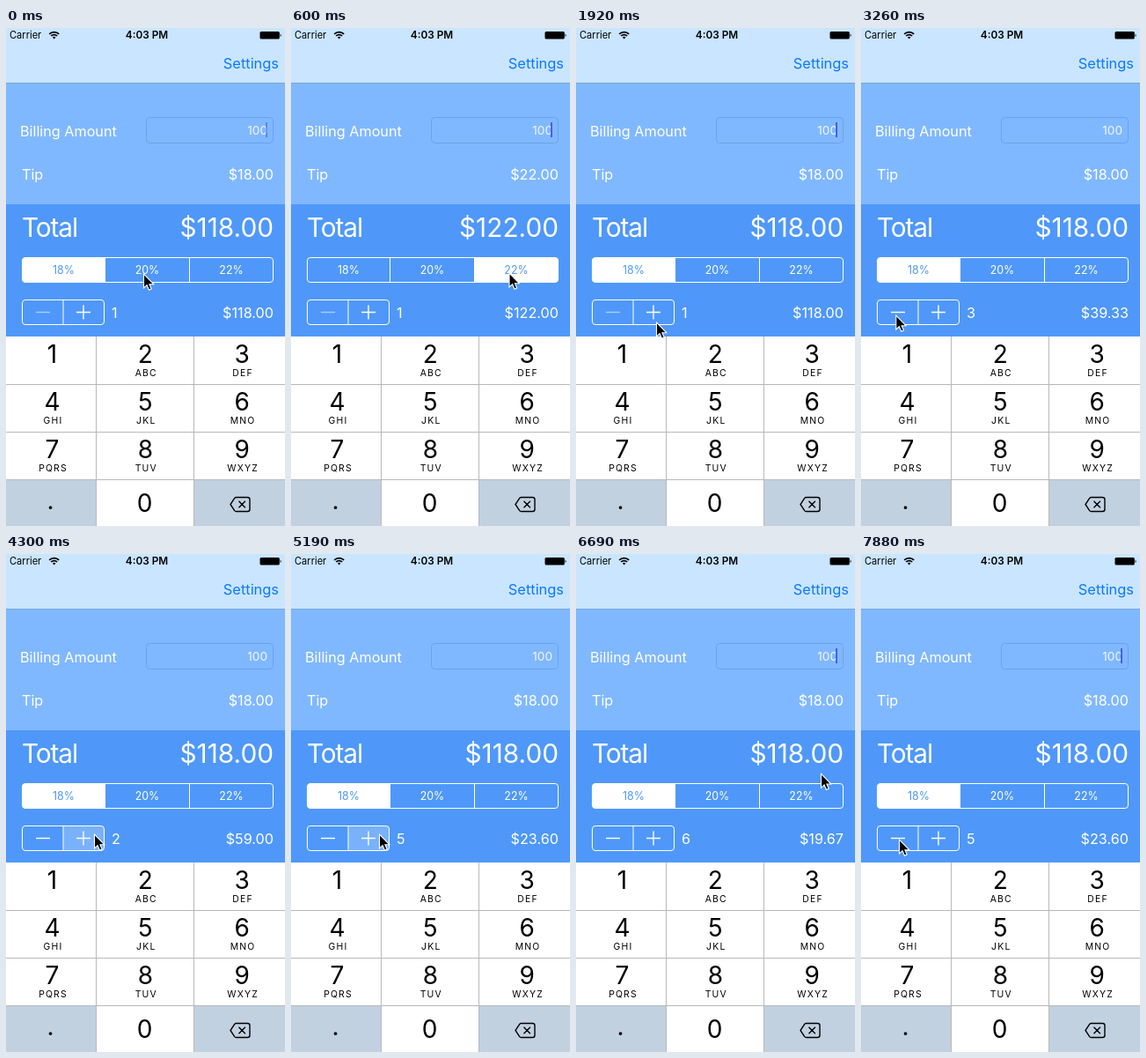
An HTML page for the animation above (8 s loop, 317 by 565 pixels).

```html
<!DOCTYPE html>
<html lang="en">
<head>
<meta charset="utf-8">
<title>Tip calculator</title>
<style>
  html, body { margin: 0; width: 100%; height: 100%; overflow: hidden; }
  svg { display: block; width: 100vw; height: 100vh; font-family: Inter, "Open Sans", sans-serif; }
  .end { text-anchor: end; }
  .mid { text-anchor: middle; }
  .label { font-size: 16.2px; }
  .big { font-size: 29.8px; }
  .line { fill: none; stroke: #fff; }
  .seg { font-size: 12.4px; text-anchor: middle; }
  .digit { font-size: 28px; text-anchor: middle; }
  .letters { font-size: 10.4px; letter-spacing: 1.2px; text-anchor: middle; }
</style>
</head>
<body>
<svg viewBox="0 0 317 565">
  <rect width="317" height="63" fill="#cae5ff"/>
  <rect y="62" width="317" height="138" fill="#80b8ff"/>
  <path d="M0 62.5H317" stroke="#78a6d8"/>
  <rect y="200" width="317" height="150" fill="#4f98f9"/>

  <text x="4" y="12.3" font-size="11.1">Carrier</text>
  <g transform="translate(.6)">
    <path d="M48.6 6.8a7.8 7.8 0 0 1 11 0M50.6 9a4.9 4.9 0 0 1 7 0" fill="none" stroke="#000" stroke-width="1.7"/>
    <path d="M54.1 12.4l-1.8-1.9a2.6 2.6 0 0 1 3.6 0z"/>
  </g>
  <text class="mid" x="160" y="12.3" font-size="11.8" font-weight="600">4:03 PM</text>
  <rect x="288.5" y="4" width="22.3" height="8.5" rx="1.5"/>
  <path d="M311.6 6.5q2 1.8 0 3.5z"/>
  <text class="end" x="310" y="46" font-size="16.4" fill="#0a7aff">Settings</text>

  <g fill="#fff">
    <text class="label" x="16" y="123.2">Billing Amount</text>
    <rect x="159.5" y="101.5" width="144" height="29" rx="4" fill="none" stroke="#6ba2ea"/>
    <text class="end" x="297" y="120.8" font-size="13.6" fill="#f0f6ff">100</text>
    <rect id="caret" x="295" y="107" width="2" height="17" fill="#4560e4"/>
    <text class="label" x="18" y="171.5">Tip</text>
    <text class="label end" id="tip" x="304" y="171.5"></text>
    <text class="big" x="18" y="237" letter-spacing="-1.1">Total</text>
    <text class="big end" id="total" x="304" y="237"></text>

    <rect id="chosen" y="260.5" height="28"/>
    <g id="segments"></g>
    <rect class="line" x="18.5" y="260.5" width="285" height="28" rx="3.5"/>
    <path class="line" d="M112.5 260.5v28M208.5 260.5v28"/>

    <rect id="pressed" y="309" width="46" height="27" fill-opacity=".24"/>
    <rect class="line" x="18.5" y="308.5" width="93" height="28" rx="3.5"/>
    <path class="line" d="M65 308.5v28"/>
    <path class="line" id="minus" d="M34 322.5h16" stroke-width="1.4"/>
    <path class="line" d="M80 322.5h16M88 314.5v16" stroke-width="1.4"/>
    <text class="label" id="count" x="120" y="328.5"></text>
    <text class="label end" id="share" x="304" y="328.5"></text>
  </g>

  <rect y="350" width="317" height="215" fill="#fff"/>
  <path d="M0 512h102.5v53H0zM213.5 512H317v53H213.5z" fill="#c2d1e0"/>
  <path d="M0 404.5H317M0 458.5H317M0 512.5H317M102.5 350V565M213.5 350V565" stroke="#b6b9bc"/>
  <g id="keys"></g>
  <path d="M261.5 532.5h13q2.5 0 2.5 2.5v11q0 2.5-2.5 2.5h-13q-1 0-1.8-.9l-4.7-7.1 4.7-7.1q.8-.9 1.8-.9zM264.5 536.8l7.4 7.4M271.9 536.8l-7.4 7.4" fill="none" stroke="#000" stroke-width="1.4"/>

  <path id="cursor" d="M0 0V16l3.6-3.3 2.4 5.5 2.7-1.2-2.3-5.3H11.3Z" stroke="#fff" stroke-width="1.1"/>
</svg>
<script>
const LOOP = 8000, TICK = 148.5, BILL = 100, RATES = [18, 20, 22];
const SEG_EDGES = [18.5, 112.5, 208.5, 303.5];
const TRAVEL = 350, PAUSE = 80, REPEAT = 295;   // pointer trip, wait before a tap, stepper repeat
const $ = id => document.getElementById(id);

const spots = {
  seg0: [57, 274], seg1: [156.5, 279], seg2: [248, 278],
  belowPlus: [91.5, 334], plus: [91, 327], plusEdge: [100.5, 318],
  minus: [38.5, 326], minusEdge: [43.5, 324], left: [33, 315], total: [278.5, 249.3]
};
// What the pointer does: go to a spot, then choose a rate or step the count.
const actions = [
  { at: 140, spot: 'seg1', rate: 1 },
  { at: 580, spot: 'seg2', rate: 2 },
  { at: 1220, spot: 'seg0', rate: 0 },
  { at: 1990, spot: 'belowPlus' },
  { at: 2210, spot: 'plus', step: 1, times: 2 },
  { at: 3380, spot: 'minus', step: -1, times: 2 },
  { at: 4300, spot: 'plusEdge', step: 1, times: 5 },
  { at: 6150, spot: 'left' },
  { at: 6690, spot: 'total' },
  { at: 7400, spot: 'minusEdge' },
  { at: 7860, spot: 'minusEdge', step: -1, times: 1 }
];

const clamp = v => Math.max(0, Math.min(1, v));
const money = v => '$' + v.toFixed(2);

function stateAt(t) {
  let rate = 0, count = 1, press = 0, [x, y] = spots.seg1, free = 0;
  for (const a of actions) {
    const arrive = a.at - PAUSE, leave = Math.max(free, arrive - TRAVEL);
    const u = clamp((t - leave) / (arrive - leave)), ease = u * u * (3 - 2 * u);
    x += (spots[a.spot][0] - x) * ease;
    y += (spots[a.spot][1] - y) * ease;
    free = a.at;
    if (t >= a.at && 'rate' in a) rate = a.rate;
    if (a.step) {
      free += (a.times - 1) * REPEAT;
      if (t >= a.at) count += a.step * Math.min(a.times, 1 + Math.floor((t - a.at) / REPEAT));
      if (t >= a.at && t < free) press = a.step;
    }
  }
  return { rate, count, press, x, y };
}

function buildKeys() {
  const names = ['', 'ABC', 'DEF', 'GHI', 'JKL', 'MNO', 'PQRS', 'TUV', 'WXYZ'];
  $('keys').innerHTML = names.map((name, i) => {
    const x = 52.5 + 107.8 * (i % 3) - (i % 3 === 1 ? 2 : 0), y = 380 + 54 * Math.floor(i / 3);
    return `<text class="digit" x="${x}" y="${y}">${i + 1}</text>` +
      `<text class="letters" x="${x + 1}" y="${y + 15}">${name}</text>`;
  }).join('') + '<text class="digit" x="50.5" y="546">.</text><text class="digit" x="157.5" y="549">0</text>';
  $('segments').innerHTML = RATES.map((rate, i) =>
    `<text class="seg" x="${(SEG_EDGES[i] + SEG_EDGES[i + 1]) / 2}" y="279">${rate}%</text>`).join('');
}

function draw(time) {
  const t = Math.floor((time % LOOP + 20) / TICK) * TICK;
  const { rate, count, press, x, y } = stateAt(t);
  const tip = BILL * RATES[rate] / 100, total = BILL + tip;
  $('tip').textContent = money(tip);
  $('total').textContent = money(total);
  $('count').textContent = count;
  $('share').textContent = money(total / count);

  $('chosen').setAttribute('x', SEG_EDGES[rate]);
  $('chosen').setAttribute('width', SEG_EDGES[rate + 1] - SEG_EDGES[rate]);
  $('chosen').setAttribute('rx', rate === 1 ? 0 : 3);
  [...$('segments').children].forEach((label, i) =>
    label.setAttribute('fill', i === rate ? '#4f98f9' : '#fff'));

  $('pressed').setAttribute('x', press < 0 ? 19 : 65);
  $('pressed').setAttribute('opacity', Math.abs(press));
  $('minus').setAttribute('opacity', count > 1 ? 1 : .5);

  // The caret blinks once a second with short fades.
  const phase = (t + 100) % 1000;
  $('caret').setAttribute('opacity', phase < 500 ? clamp((180 - phase) / 140) : clamp((phase - 520) / 120));
  $('cursor').setAttribute('transform', `translate(${x} ${y})`);
}

buildKeys();
function frame() {
  draw(performance.now());
  requestAnimationFrame(frame);
}
frame();
</script>
</body>
</html>
```
